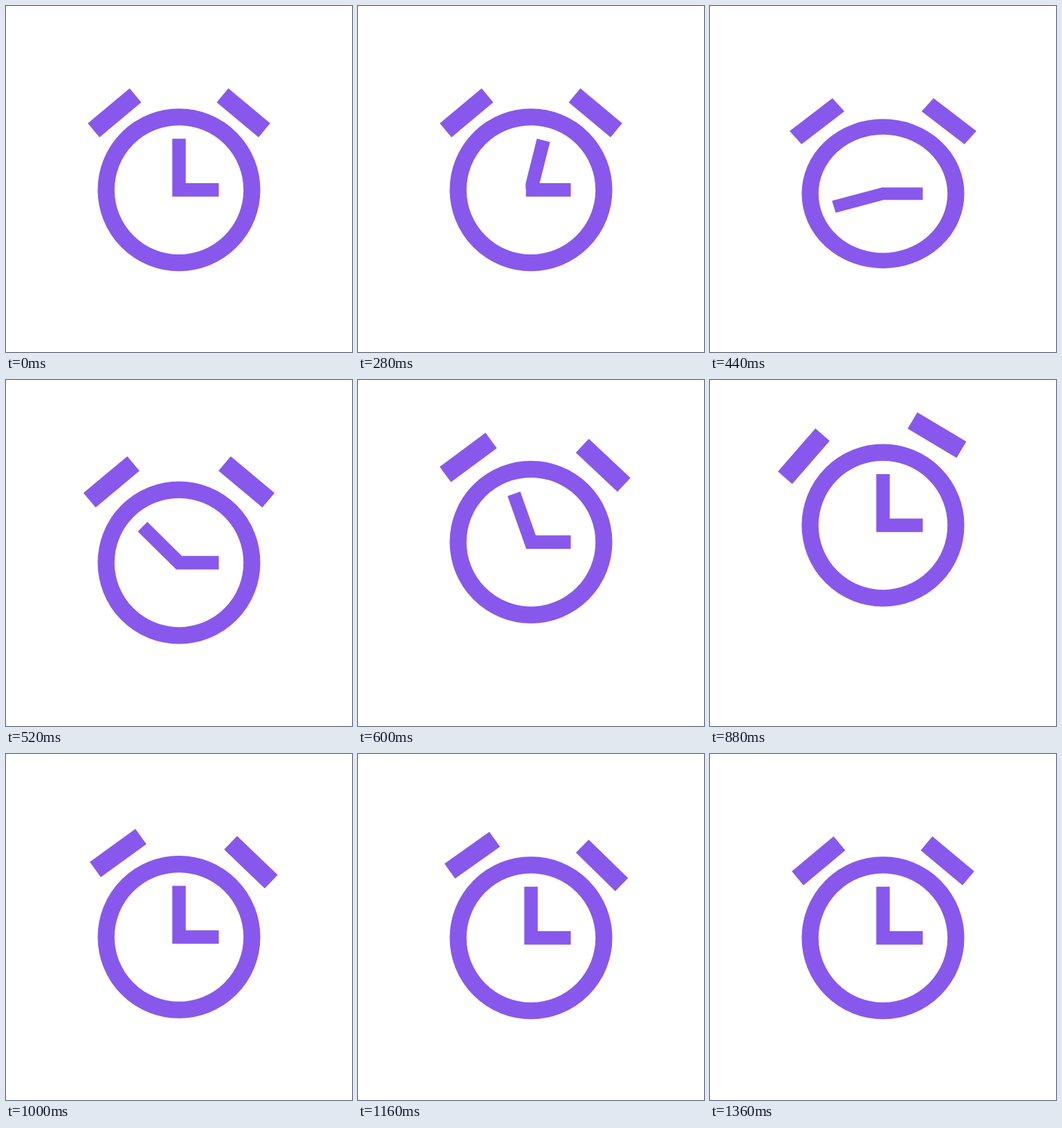
An HTML page with a canvas for the animation above (1680 ms loop, 500 by 500 pixels).

```html
<!DOCTYPE html>
<html lang="en">
<head>
<meta charset="utf-8">
<title>Alarm clock</title>
<style>
  html, body { margin: 0; width: 100%; height: 100%; overflow: hidden; background: #fff; }
  canvas { display: block; width: 100vw; height: 100vh; object-fit: contain; }
</style>
</head>
<body>
<canvas id="stage" width="500" height="500"></canvas>
<script>
const ctx = document.getElementById('stage').getContext('2d');
const LOOP = 1680, STEP = 40, COLOR = '#8858ec';
const RAD = Math.PI / 180;

const smooth = x => x * x * (3 - 2 * x);
const easeOut = x => 1 - (1 - x) ** 2;

// Keys are [time, value, easing towards this key].
function track(t, keys) {
  if (t <= keys[0][0]) return keys[0][1];
  for (let i = 1; i < keys.length; i++) {
    const [t0, v0] = keys[i - 1], [t1, v1, ease = smooth] = keys[i];
    if (t < t1) return v0 + (v1 - v0) * ease((t - t0) / (t1 - t0));
  }
  return keys[keys.length - 1][1];
}

// Sharp start, long settle: cubic-bezier(.65, 0, 0, 1).
function spinEase(x) {
  let lo = 0, hi = 1;
  for (let i = 0; i < 30; i++) {
    const s = (lo + hi) / 2;
    if (3 * s * (1 - s) ** 2 * 0.65 + s ** 3 < x) lo = s; else hi = s;
  }
  return smooth(lo);
}

const lift = [[300, 0], [500, 7], [830, -68, easeOut], [1015, 0]];
const squash = [[290, 1], [410, 0.9], [520, 1]];
const bellScale = [[360, 1], [520, 1.048], [820, 1.048], [1300, 1]];
const bellTurn = [[554, 0], [680, 11], [880, -9], [1080, 11], [1240, -2], [1360, 0]];
const spin = [[160, 0], [820, 360, spinEase]];

function drawBells(t) {
  const scale = track(t, bellScale);
  ctx.save();
  ctx.rotate(track(t, bellTurn) * RAD);
  ctx.scale(scale, scale);
  for (const side of [-1, 1]) {
    ctx.save();
    ctx.rotate(side * 39.9 * RAD);
    ctx.fillRect(-39.4, -158.3, 78.8, 26.2);
    ctx.restore();
  }
  ctx.restore();
}

function drawHands(angle) {
  const half = 9.75, reach = 57.5, length = 73.9;
  const sin = Math.sin(angle), cos = Math.cos(angle);
  ctx.save();
  ctx.lineWidth = half * 2;
  ctx.beginPath();
  if (sin > 0) {
    // Sharp angle between the hands: cut the joint off vertically.
    const left = -half * Math.abs(cos) / (1 + sin);
    ctx.rect(left, -100, 200, 200);
    ctx.clip();
    ctx.fillRect(left, -half, reach - left, half * 2);
    ctx.beginPath();
    ctx.moveTo(0, 0);
    ctx.lineTo(length * sin, -length * cos);
  } else {
    ctx.moveTo(length * sin, -length * cos);
    ctx.lineTo(0, 0);
    ctx.lineTo(reach, 0);
  }
  ctx.stroke();
  ctx.restore();
}

function draw(now) {
  const t = Math.floor(now % LOOP / STEP) * STEP;
  ctx.fillStyle = '#fff';
  ctx.fillRect(0, 0, 500, 500);
  ctx.fillStyle = ctx.strokeStyle = COLOR;
  ctx.save();
  ctx.translate(250, 265.75 + track(t, lift));
  ctx.scale(1, track(t, squash));
  ctx.lineWidth = 24.3;
  ctx.beginPath();
  ctx.arc(0, 0, 105.35, 0, Math.PI * 2);
  ctx.stroke();
  drawBells(t);
  drawHands(track(t, spin) * RAD);
  ctx.restore();
}

let start;
function tick(now) {
  start ??= now;
  draw(now - start);
  requestAnimationFrame(tick);
}
draw(0);
requestAnimationFrame(tick);
</script>
</body>
</html>
```
